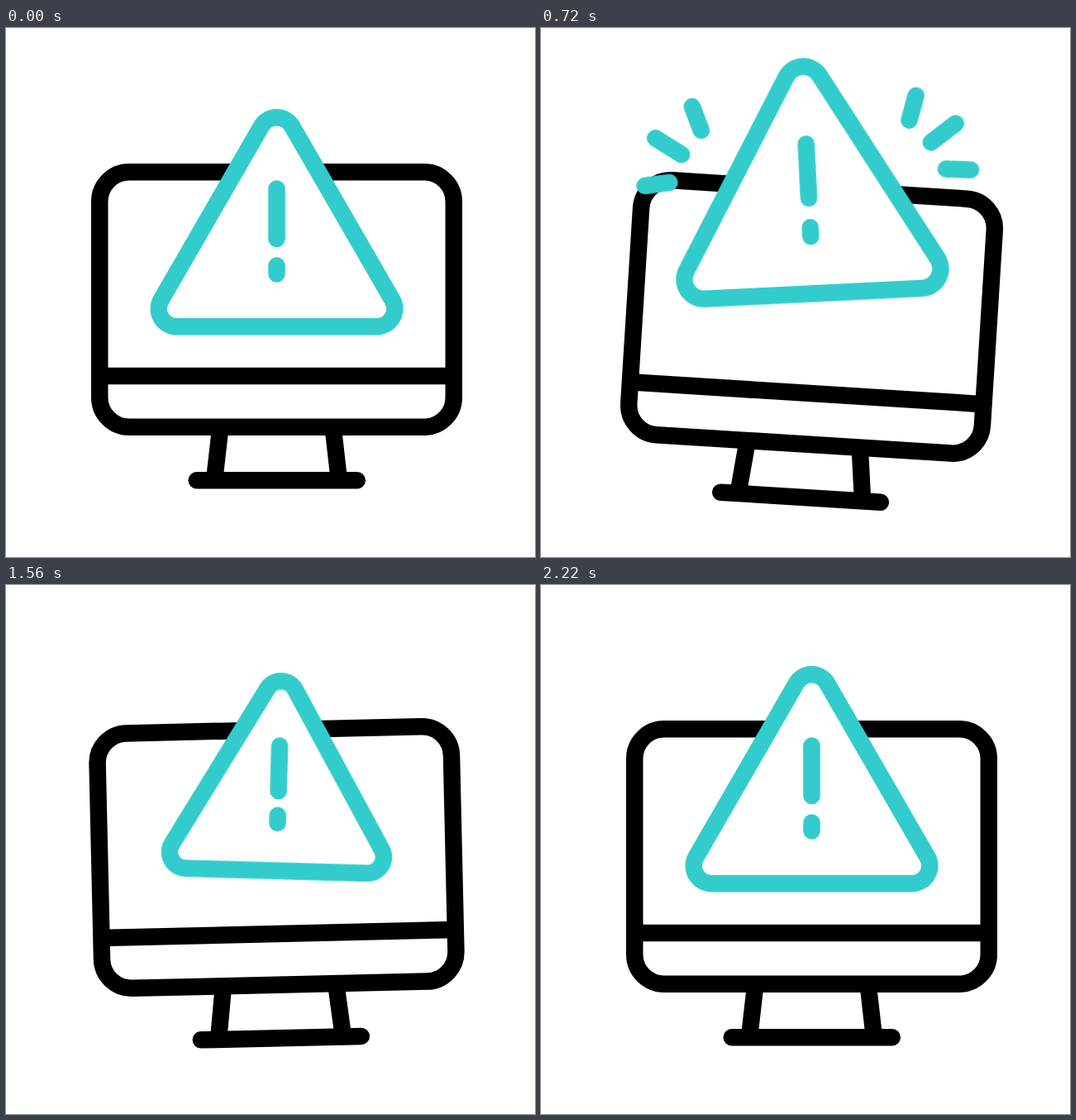
An HTML page for the animation above (2300 ms loop, 640 by 640 pixels).

```html
<!DOCTYPE html>
<html lang="en">
<head>
<meta charset="utf-8">
<title>Computer warning</title>
<style>
  @property --k { syntax: "<number>"; inherits: true; initial-value: 1; }

  html, body { margin: 0; width: 100%; height: 100%; overflow: hidden; background: #fff; }
  svg { display: block; width: 640px; height: 640px; }
  path, rect { fill: none; stroke-width: 20.5px; }

  .monitor { stroke: #000; }
  .alert { stroke: #3cc; stroke-linecap: round; }
  .monitor, .alert { transform-origin: 327.5px 328.5px; }

  /* scales the shape but keeps its line weight */
  .scaled { scale: var(--k); stroke-width: calc(20.5px / var(--k)); }
  .sign path:first-child { fill: #fff; }

  .monitor { animation: drop 2300ms linear infinite, tilt 2300ms linear infinite; }
  .alert { animation: rise 2300ms linear infinite, sway 2300ms linear infinite; }
  .sign { animation: pulse 2300ms cubic-bezier(.37, 0, .63, 1) infinite; }
  .rays {
    animation: grow 2300ms cubic-bezier(.37, 0, .63, 1) infinite,
               fade 2300ms linear infinite;
  }

  @keyframes drop {
    0% { translate: 0 0; }
    14.5% { translate: 0 0; animation-timing-function: ease-in; }
    20% { translate: 0 8px; }
    23.5% { translate: 0 21px; animation-timing-function: ease-out; }
    27.5% { translate: 0 26.5px; animation-timing-function: ease-in; }
    31.3% { translate: 0 21px; animation-timing-function: cubic-bezier(.3, .45, .65, .9); }
    47% { translate: 0 9px; }
    53% { translate: 0 6.5px; }
    67.8% { translate: 0 1px; animation-timing-function: ease-out; }
    80%, 100% { translate: 0 0; }
  }
  @keyframes tilt {
    0% { rotate: 0deg; }
    7% { rotate: 0deg; animation-timing-function: ease-in; }
    20% { rotate: 2.35deg; }
    23.5% { rotate: 3.58deg; animation-timing-function: ease-out; }
    27.5% { rotate: 4deg; animation-timing-function: ease-in; }
    31.3% { rotate: 3.6deg; }
    47% { rotate: 1.6deg; }
    53% { rotate: .65deg; }
    67.8% { rotate: -1.3deg; animation-timing-function: ease-out; }
    72% { rotate: -1.9deg; animation-timing-function: ease-in-out; }
    85%, 100% { rotate: 0deg; }
  }
  @keyframes rise {
    0% { translate: 0 0; }
    14.5% { translate: 0 0; animation-timing-function: ease-in; }
    20% { translate: 0 -23.6px; }
    23.5% { translate: 0 -53px; animation-timing-function: ease-out; }
    27.5% { translate: 0 -67px; animation-timing-function: ease-in; }
    31.3% { translate: 0 -51px; animation-timing-function: cubic-bezier(.3, .45, .65, .9); }
    47% { translate: 0 -23px; }
    53% { translate: 0 -18.6px; }
    67.8% { translate: 0 -3.8px; animation-timing-function: ease-out; }
    80%, 100% { translate: 0 0; }
  }
  @keyframes sway {
    0% { rotate: 0deg; }
    7% { rotate: 0deg; animation-timing-function: ease-in; }
    20% { rotate: -2.35deg; }
    31.3% { rotate: -2.8deg; animation-timing-function: ease-out; }
    51% { rotate: -4deg; animation-timing-function: ease-in-out; }
    65.5% { rotate: 1.7deg; animation-timing-function: ease-in-out; }
    79.7% { rotate: -.45deg; animation-timing-function: ease-in-out; }
    94%, 100% { rotate: 0deg; }
  }
  @keyframes pulse {
    0% { --k: 1; }
    7.25% { --k: .9; }
    36.23% { --k: 1.1; }
    65.2% { --k: .905; }
    94%, 100% { --k: 1; }
  }
  @keyframes grow {
    0%, 20% { --k: .02; }
    29%, 49.3% { --k: 1; }
    58%, 69.5% { --k: .02; }
    78.3%, 100% { --k: 1; }
  }
  @keyframes fade {
    0%, 19% { opacity: 0; }
    20% { opacity: .25; }
    22%, 57.5% { opacity: 1; }
    60.5%, 69% { opacity: 0; }
    72%, 93.9% { opacity: 1; }
    96.5%, 100% { opacity: 0; }
  }
</style>
</head>
<body>
<svg viewBox="0 0 640 640">
  <g class="monitor">
    <rect x="113.25" y="174.25" width="428.5" height="308.5" rx="35.75"/>
    <path d="M113.25 421H541.75M258.8 488L252.3 545M396.2 488L402.7 545"/>
    <path d="M230.75 547.2H424.75" stroke-linecap="round"/>
  </g>

  <g class="alert">
    <g class="rays" transform="translate(327.5 0)">
      <g id="side">
        <g transform="translate(113.5 169)"><path class="scaled" d="M12.5-.5L22-30"/></g>
        <g transform="translate(136 194.5)"><path class="scaled" d="M15 2L46-19.5"/></g>
        <g transform="translate(150.7 224.7)"><path class="scaled" d="M16.8 4.8L46.8 7.3"/></g>
      </g>
      <use href="#side" transform="scale(-1 1)"/>
    </g>
    <g class="sign" transform="translate(327.5 234.75)">
      <path class="scaled" d="M-18.7-115.7A21.6 21.6 0 0 1 18.7-115.7L139.85 94.1A21.6 21.6 0 0 1 121.15 126.5H-121.15A21.6 21.6 0 0 1-139.85 94.1Z"/>
      <path class="scaled" d="M0-40.25V20.25M0 52.75V62.75"/>
    </g>
  </g>
</svg>
</body>
</html>
```
